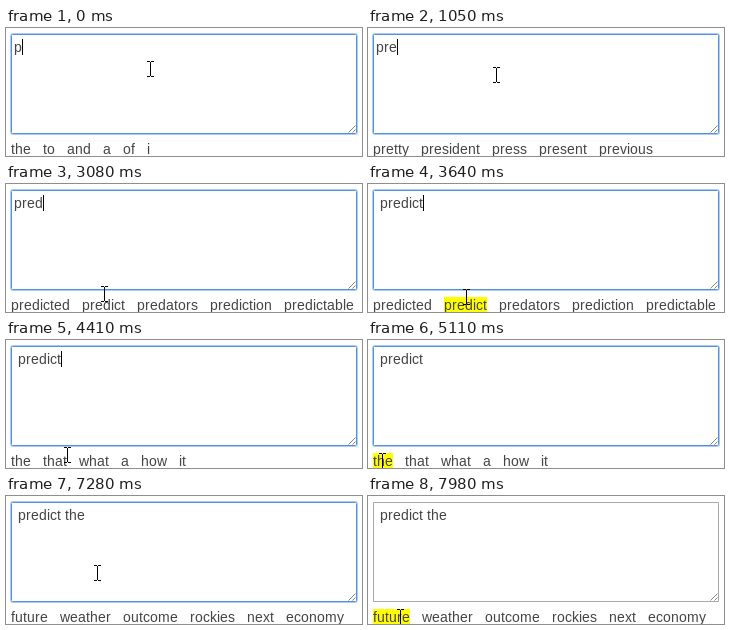
An HTML page with a canvas that plays this animation: 356x128 px, repeating every 8 s.

```html
<!DOCTYPE html>
<html lang="en">
<head>
<meta charset="utf-8">
<title>Predictive typing</title>
<style>
  html, body { margin: 0; height: 100%; overflow: hidden; background: #fff; }
  canvas { display: block; }
</style>
</head>
<body>
<canvas id="stage" width="356" height="128"></canvas>
<script>
const ctx = document.getElementById('stage').getContext('2d');
const LOOP = 8000, TICK = 70;
const INK = '#444', RING = '#4f90e0';

// Each track is a list of [start ms, value].
const typed = [[0, 'p'], [140, 'pr'], [280, 'pre'], [1820, 'pred'], [3640, ' predict'], [5390, ' predict the']];
const suggestions = [
  [0, 'the to and a of i'],
  [350, 'people part post please point'],
  [700, 'pretty president press present previous'],
  [2170, 'predicted predict predators prediction predictable'],
  [3920, 'the that what a how it'],
  [5670, 'future weather outcome rockies next economy']
];
const focused = [[0, true], [3430, false], [3640, true], [5250, false], [5390, true], [7980, false]];
const caretOn = [
  [0, true], [1120, false], [1680, true], [2450, false], [3010, true], [4830, false],
  [5390, true], [5950, false], [6510, true], [7070, false], [7630, true]
];

// Pointer hotspot: [ms, x, y, eased arrival]
const path = [
  [0, 144, 41], [840, 144, 41], [1050, 128, 47], [1330, 104, 84], [1540, 99, 76],
  [2380, 99, 76], [3220, 98, 113, true], [4200, 98, 113], [4690, 5, 119, true],
  [4760, 5, 119], [5110, 14, 121, true], [5600, 14, 121], [6300, 105, 70, true],
  [6440, 108, 65], [6650, 111, 62], [6720, 111, 62], [6790, 111, 61],
  [7000, 111, 61], [7840, 32, 121, true], [LOOP, 32, 121]
];

const at = (track, t) => track.findLast(([start]) => start <= t)[1];

function pointerAt(t) {
  const next = path.findIndex(p => p[0] > t);
  const a = path[next - 1], b = path[next];
  let k = (t - a[0]) / (b[0] - a[0]);
  if (b[3]) k = k * k * (3 - 2 * k);
  return [1, 2].map(i => Math.round(a[i] + (b[i] - a[i]) * k));
}

// Letters advance by whole pixels.
const advance = ch => Math.round(ctx.measureText(ch).width);
const widthOf = text => [...text].reduce((sum, ch) => sum + advance(ch), 0);

function write(text, x, y) {
  ctx.fillStyle = INK;
  for (const ch of text) {
    ctx.fillText(ch, x, y);
    x += advance(ch);
  }
  return x;
}

function frame(x, y, w, h, radius, color) {
  ctx.strokeStyle = color;
  ctx.beginPath();
  ctx.roundRect(x + .5, y + .5, w - 1, h - 1, radius);
  ctx.stroke();
}

function drawBox(focus) {
  if (focus) {
    frame(4, 5, 348, 102, 2, 'rgba(79,144,224,.45)');
    frame(5, 6, 346, 100, 1, RING);
  } else {
    frame(5, 6, 346, 100, 0, '#a9a9a9');
  }
  ctx.strokeStyle = '#888';
  ctx.beginPath();
  for (const size of [7, 3]) {
    ctx.moveTo(349.5 - size, 104.5);
    ctx.lineTo(349.5, 104.5 - size);
  }
  ctx.stroke();
}

function drawSuggestions(words, px, py) {
  let x = 5;
  for (const word of words.split(' ')) {
    const w = widthOf(word);
    if (py >= 113 && px >= x && px < x + w) {
      ctx.fillStyle = '#ff0';
      ctx.fillRect(x, 113, w, 16);
    }
    x = write(word, x, 126) + 12;
  }
}

function drawPointer(x, y) {
  ctx.fillStyle = '#000';
  ctx.fillRect(x, y - 7, 1, 14);
  for (const row of [y - 8, y + 7]) {
    ctx.fillRect(x - 3, row, 3, 1);
    ctx.fillRect(x + 1, row, 3, 1);
  }
}

function draw(now) {
  const t = Math.floor(now % LOOP / TICK) * TICK;
  const [px, py] = pointerAt(t);
  const focus = at(focused, t);

  ctx.fillStyle = '#fff';
  ctx.fillRect(0, 0, 356, 128);
  ctx.font = '14px "Liberation Sans", Arial, sans-serif';
  drawBox(focus);
  const end = write(at(typed, t), 8, 24);
  if (focus && at(caretOn, t)) {
    ctx.fillStyle = '#000';
    ctx.fillRect(end, 11, 1, 16);
  }
  drawSuggestions(at(suggestions, t), px, py);
  drawPointer(px, py);
  requestAnimationFrame(draw);
}
requestAnimationFrame(draw);
</script>
</body>
</html>
```
